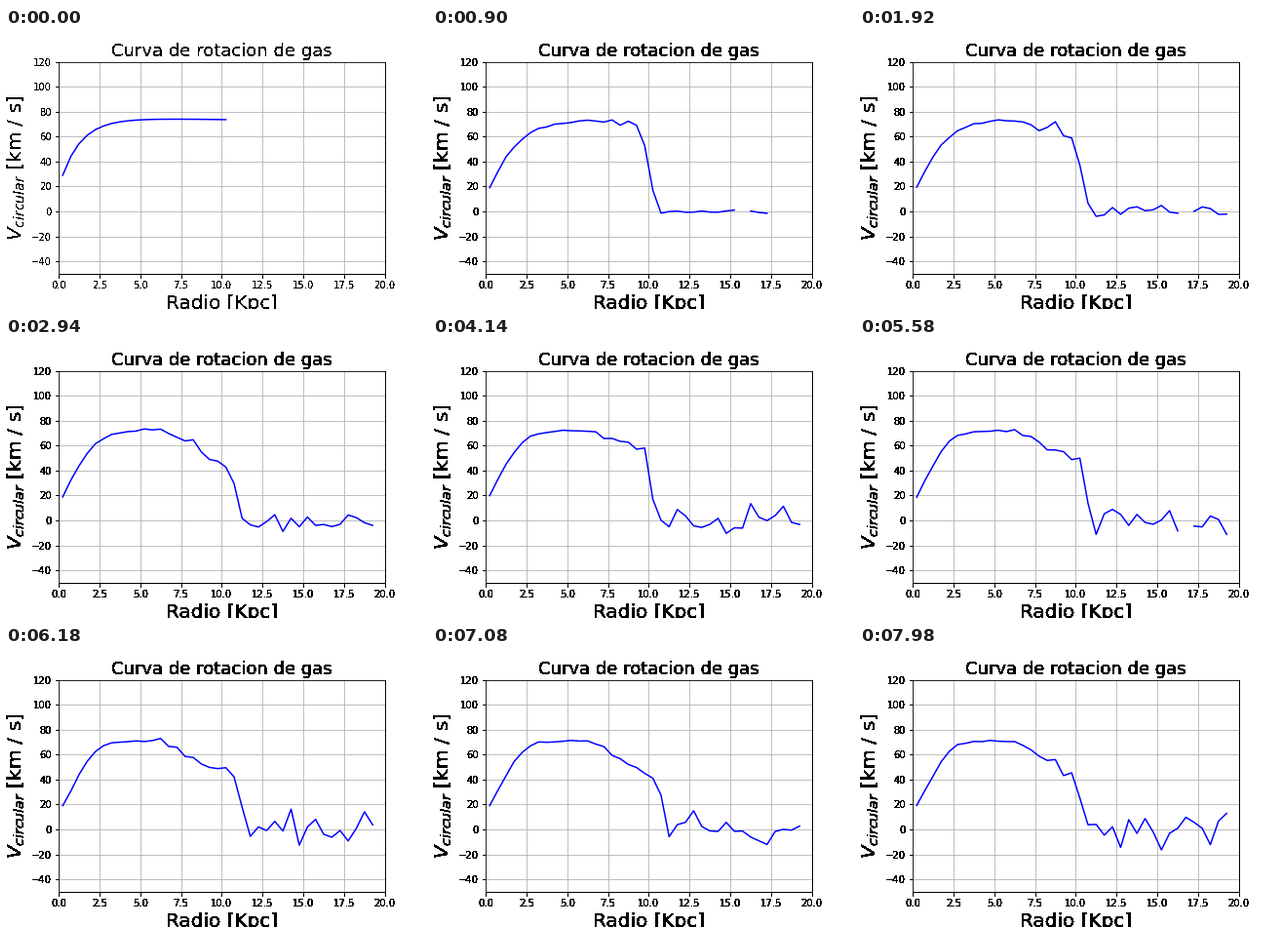
A matplotlib script for the animation above (8000 ms loop, 432 by 288 pixels).

```python
import numpy as np
import matplotlib.pyplot as plt
from matplotlib.animation import FuncAnimation

plt.rcParams["font.family"] = "DejaVu Sans"

BINS = 39
STEPS = 134
HOLD = 3            # ticks of 20 ms per step
SETTLE = 15         # steps until the disc has left its smooth start
KNOT = 4            # steps between fresh noise values

k = np.arange(BINS)
radius = 0.25 + 0.5 * k


def start_curve():
    v = 74.6 - 45.6 * np.exp(-0.405 * k) - 0.0025 * k**2
    return np.where(k <= 20, v, 0)


def disc_curve(n):
    """Rise to a plateau, sloping shelf from bin 12, then a sharp edge."""
    top = 75.2 - 0.035 * n
    power = 2.5 + 0.033 * n
    x = (k + 1.5) / 5.65
    rise = top * x / (1 + x**power) ** (1 / power)
    times = [15, 49, 69, 83, 103, 133]
    edge = np.interp(n, times, [19.5, 21.2, 19.9, 19.8, 22, 20.4])
    shelf = np.interp(n, times, [0.95, 0.6, 0.75, 0.65, 0.5, 0.57])
    slope = 1 - (1 - shelf) * np.clip((k - 12) / (edge - 12), 0, 1)
    cut = np.clip((edge - k) / 1.6 + 0.5, 0, 1)
    return rise * slope * cut


def simulate():
    """Velocity for every step and bin; empty bins are NaN."""
    rng = np.random.default_rng(7)
    draws = STEPS // KNOT + 2
    jitter = np.clip(rng.normal(size=(draws, BINS)), -2.2, 2.2)
    chance = rng.random((draws, BINS))
    out = np.empty((STEPS, BINS))
    for n in range(STEPS):
        grown = min(1, n / SETTLE)
        i, part = n // KNOT, n % KNOT / KNOT
        noise = (1 - part) * jitter[i] + part * jitter[i + 1]
        outer = 1 + 8 * min(1, n / 75) ** 2
        sigma = np.interp(k, [0, 11, 15, 19, 23], [0.5, 0.6, 3, 5, outer])
        base = (1 - grown) * start_curve() + grown * disc_curve(n)
        v = np.minimum(base + grown * sigma * noise, 76)
        reach = np.interp(n, [0, SETTLE, 30], [20, 34, 38])
        sparse = np.interp(k, [23, 38], [0, 0.2]) * np.exp(-n / 60)
        out[n] = np.where((k > reach) | (chance[i] < sparse), np.nan, v)
    return out


def limits():
    ax.set_xlim(0, 20)
    ax.set_ylim(-50, 120)


fig, ax = plt.subplots(figsize=(6, 4), dpi=72, facecolor=(1, 1, 1, 0))
fig.subplots_adjust(left=0.125, right=0.9, bottom=0.125, top=0.88)
limits()
ax.grid()
ax.set_title("Curva de rotacion de gas", fontsize=18)
ax.set_xlabel("Radio [Kpc]", fontsize=20)
ax.set_ylabel("$V_{circular}$ [km / s]", fontsize=20)

# Chart drawn once; its hard-edged lettering thickens over the first steps.
fig.canvas.draw()
chart = np.array(fig.canvas.buffer_rgba())
cover = chart[..., 3:] / 255


def backdrop(n):
    level = 0.1 + 0.28 * np.exp(-n / 3)
    return np.where(cover > level, chart[..., :3], 255).astype(np.uint8)


backdrops = [backdrop(n) for n in range(SETTLE)]

ax.clear()
ax.axis("off")
limits()
fig.set_facecolor("white")
image = fig.figimage(backdrops[0], zorder=-1)
line, = ax.plot([], [], color="b", lw=1.5)
speeds = simulate()


def update(tick):
    n = tick // HOLD
    image.set_data(backdrops[min(n, SETTLE - 1)])
    line.set_data(radius, speeds[n])
    return image, line


anim = FuncAnimation(fig, update, frames=STEPS * HOLD - 2, interval=20,
                     repeat=True, repeat_delay=0, blit=False)
plt.show()
```
